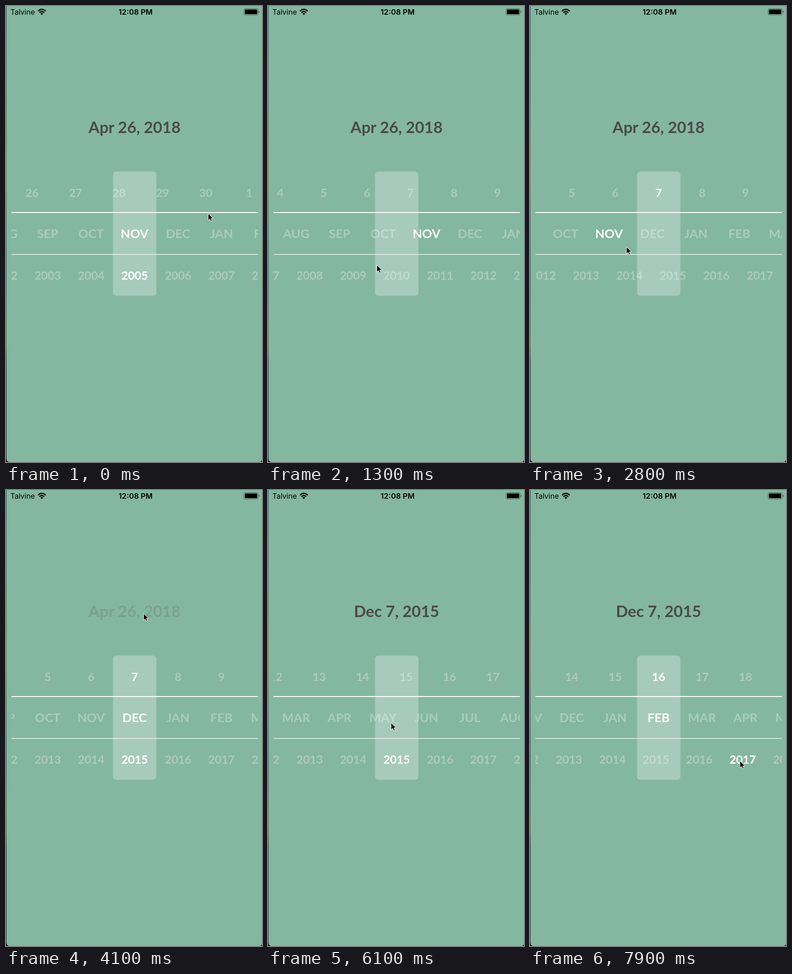
Recreate the animation shown at these times as an HTML page. Size 561 px wide and 998 px high, loop 8000 ms.

```html
<!DOCTYPE html>
<html lang="en">
<head>
<meta charset="utf-8">
<title>Date picker</title>
<style>
  html, body { margin: 0; width: 100%; height: 100%; overflow: hidden; background: #84b79f; }
  svg { display: block; width: 561px; height: 998px; }
  text { font-family: Lato, "Open Sans", sans-serif; font-weight: 700; text-anchor: middle; }
  .status { font-family: Inter, Roboto, sans-serif; font-size: 16px; fill: #000; }
  .cell { fill: #fff; fill-opacity: .3; }
  .cell.on { fill-opacity: 1; }
  .number { font-size: 25.5px; letter-spacing: -.3px; }
  .month { font-size: 27px; }
  #date { font-size: 34.7px; fill: #4a4a4a; }
</style>
</head>
<body>
<svg viewBox="0 0 561 998">
  <defs>
    <clipPath id="window"><rect x="12" y="363" width="540" height="272"/></clipPath>
    <linearGradient id="edge" x1="0" y1="0" x2="0" y2="1">
      <stop offset="0" stop-color="#1d3f5c"/>
      <stop offset=".38" stop-color="#6f7048"/>
      <stop offset=".58" stop-color="#183c58"/>
      <stop offset=".74" stop-color="#55603a"/>
      <stop offset=".78" stop-color="#0b1216"/>
    </linearGradient>
  </defs>

  <rect width="561" height="998" fill="#84b79f"/>
  <rect width="1" height="998" fill="url(#edge)"/>
  <path d="M0 990H1Q1 998 8 998H0ZM561 992Q561 998 555 998H561Z" fill="#08100c"/>

  <text class="status" x="9.5" y="18.5" style="text-anchor:start;font-weight:400">Talvine</text>
  <g fill="none" stroke="#000" stroke-width="2.7">
    <path d="M70 11.2Q78.5 3.6 87 11.2"/>
    <path d="M73.2 14.5Q78.5 9.7 83.8 14.5"/>
  </g>
  <path d="M75.5 16.7Q78.5 14.2 81.5 16.7L78.5 19.7Z"/>
  <text class="status" x="284" y="18.5" style="font-size:16.6px;font-weight:600">12:08 PM</text>
  <rect x="521.5" y="5.5" width="31" height="14.5" rx="3.5" fill="none" stroke="#000" stroke-opacity=".45"/>
  <rect x="523.5" y="7.5" width="27" height="10.5" rx="1.8"/>
  <path d="M554 10.2Q556 10.8 556 12.8T554 15.3Z" fill-opacity=".45"/>

  <text id="date" x="281.7" y="278"></text>

  <rect x="234.5" y="362.5" width="95" height="271.7" rx="7" fill="#fff" fill-opacity=".28"/>
  <g id="reels" clip-path="url(#window)"></g>
  <path d="M12 452H552" stroke="#fff" stroke-width="2"/>
  <path d="M12 543.6H552" stroke="#fff" stroke-width="1.1"/>

  <path id="cursor" d="M0 0V15.2L3.5 12L5.8 17.2L8.4 16L6.2 11H11Z" stroke="#fff" stroke-linejoin="round"/>
</svg>
<script>
const LOOP = 8000, STEP = 100, PITCH = 95.2, CENTER = 281.7;
const MONTHS = 'JAN FEB MAR APR MAY JUN JUL AUG SEP OCT NOV DEC'.split(' ');
const RELEASE = 4550;

const smooth = x => x * x * (3 - 2 * x);
const coast = x => (1 - Math.exp(-4 * x)) / (1 - Math.exp(-4));
const clamp = x => Math.min(1, Math.max(0, x));

const flick = (at, time, to) => ({ at, time, to, ease: coast, pickAt: at + time });
const tap = (at, to) => ({ at, time: 300, to, ease: smooth, pickAt: at });

const reels = [
  {
    y: 417.5, style: 'number', from: 28.36,
    label: i => (i - 1) % 30 + 1,
    moves: [flick(0, 1790, 37), flick(4709, 2945, 46)]
  },
  {
    y: 508, style: 'month', from: 11,
    label: i => MONTHS[(i + 11) % 12],
    moves: [flick(250, 700, 10.31), flick(2400, 400, 12.14), flick(2800, 600, 12),
            flick(5900, 1000, 21.47), flick(6900, 850, 26)]
  },
  {
    y: 599, style: 'number', from: 2005,
    label: i => i,
    moves: [flick(861, 2600, 2015), tap(7868, 2017)]
  }
];

// Resting points of the pointer: time, x, y.
const pointer = [
  [0, 443, 454], [900, 430, 615], [1300, 238.5, 567], [2400, 320, 530], [2800, 211.3, 527],
  [3800, 301.5, 270], [4500, 301.5, 270], [4800, 450, 420], [5300, 334, 430],
  [5900, 440, 505], [6150, 250, 510], [6900, 471.5, 503], [7700, 460, 593], [LOOP, 460, 593]
];

function position(reel, t) {
  let value = reel.from;
  for (const m of reel.moves) value += (m.to - value) * m.ease(clamp((t - m.at) / m.time));
  return value;
}

// Only a move that comes to rest on a whole cell selects it.
function selected(reel, t) {
  const done = reel.moves.filter(m => m.pickAt <= t && Number.isInteger(m.to));
  return done.length ? done.pop().to : reel.from;
}

function pointerAt(t) {
  const n = pointer.findIndex(p => p[0] > t);
  const [t0, x0, y0] = pointer[n - 1], [t1, x1, y1] = pointer[n];
  const p = smooth((t - t0) / (t1 - t0));
  return [x0 + (x1 - x0) * p, y0 + (y1 - y0) * p];
}

function make(parent, tag, attrs) {
  const el = document.createElementNS('http://www.w3.org/2000/svg', tag);
  for (const name in attrs) el.setAttribute(name, attrs[name]);
  return parent.appendChild(el);
}

const byId = id => document.getElementById(id);
const date = byId('date'), cursor = byId('cursor');

for (const reel of reels) {
  const ends = [reel.from, ...reel.moves.map(m => m.to)];
  reel.first = Math.floor(Math.min(...ends)) - 4;
  const last = Math.ceil(Math.max(...ends)) + 4;
  reel.strip = make(byId('reels'), 'g');
  reel.cells = [];
  for (let i = reel.first; i <= last; i++) {
    const cell = make(reel.strip, 'text', { x: (i - reel.first) * PITCH, y: reel.y, class: 'cell ' + reel.style });
    cell.textContent = reel.label(i);
    reel.cells.push(cell);
  }
}

function draw(t) {
  for (const reel of reels) {
    const x = CENTER - (position(reel, t) - reel.first) * PITCH;
    reel.strip.setAttribute('transform', `translate(${x.toFixed(2)} 0)`);
    const on = selected(reel, t) - reel.first;
    reel.cells.forEach((cell, i) => cell.classList.toggle('on', i === on));
  }
  const pressed = t >= 4000;
  date.textContent = t < RELEASE ? 'Apr 26, 2018' : 'Dec 7, 2015';
  date.setAttribute('opacity', pressed ? .18 + .82 * clamp((t - RELEASE) / 250) : 1);
  cursor.setAttribute('transform', `translate(${pointerAt(t)})`);
}

const start = performance.now();
function tick() {
  const t = (performance.now() - start) % LOOP;
  draw(Math.floor(t / STEP) * STEP);
  requestAnimationFrame(tick);
}
tick();
</script>
</body>
</html>
```
